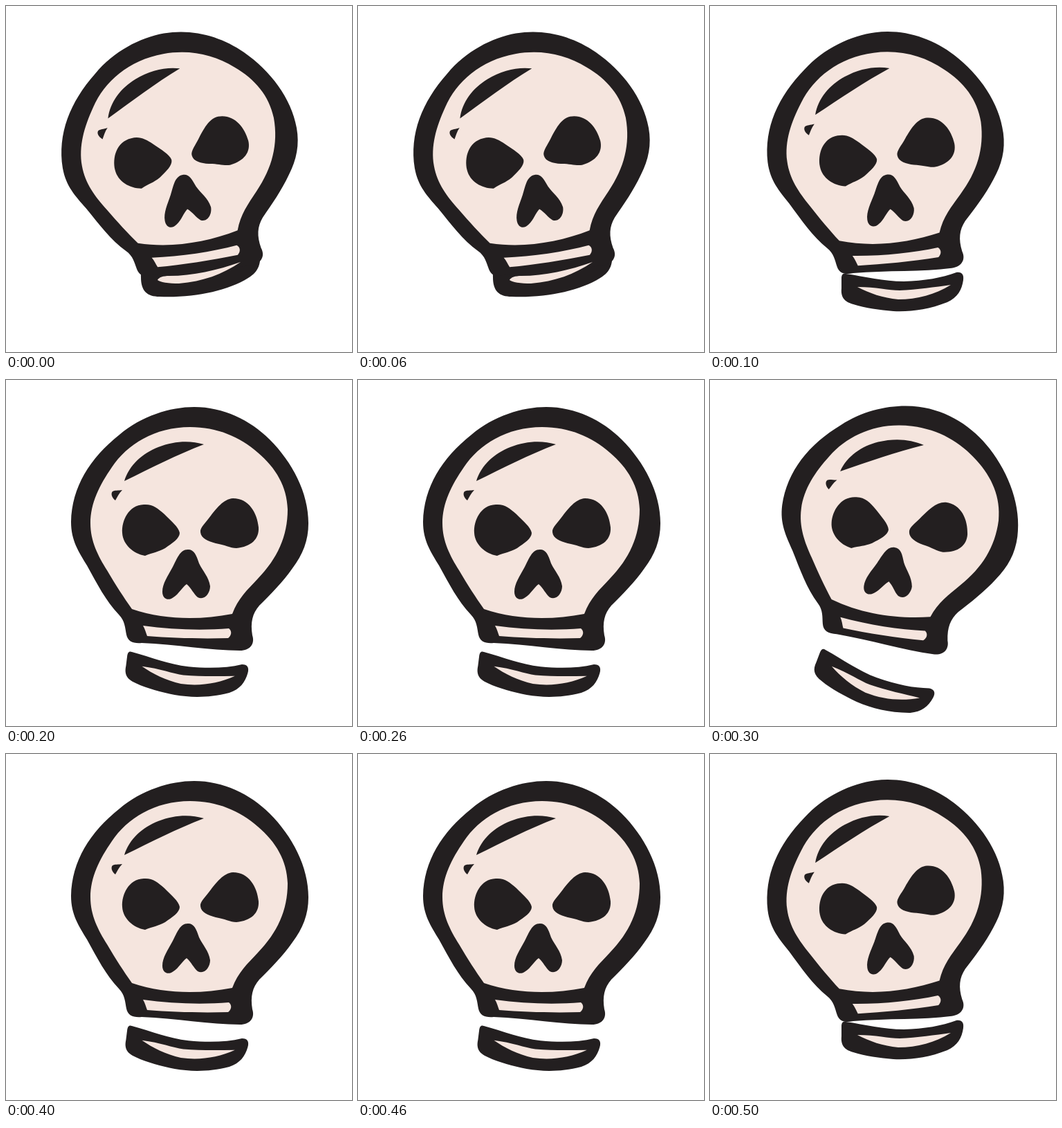
Write an HTML page that moves like this. It is 500 px wide and 500 px high and loops after 600 ms.

```html
<!DOCTYPE html>
<html lang="en">
<head>
<meta charset="utf-8">
<title>Chattering skull</title>
<style>
  html, body { margin: 0; width: 100%; height: 100%; overflow: hidden; background: #fff; }
  svg { display: block; width: 100%; height: 100%; }
  .ink { fill: #231f20; }
  .bone { fill: #f5e5de; }
</style>
</head>
<body>
<svg viewBox="0 0 500 500">
  <!-- closed jaw, merged with the neck -->
  <path id="base" class="ink" d="M180 350C192 366 195 378 195 392C195 412 204 420 222 420C270 422 320 412 350 393C366 383 368 374 368 350L340 330Z"/>

  <g id="jaw">
    <path class="ink" d="M196 387C225 391 250 398 280 398C310 397 335 393 356 385C364 384 367 388 366 396C364 410 358 421 343 428C315 439 290 442 265 441C245 439 225 437 207 431C193 427 189 420 190 408L190 394C190 388 192 386 196 387Z"/>
    <path class="bone" d="M213 406C240 406 258 411 274 411C300 410 325 406 348 403C325 417 300 424 272 424C250 422 230 415 213 406Z"/>
  </g>

  <g id="skull">
    <path class="ink" d="M272 39C237 39 196 52 164 79C121 113 95 155 94 205C94 232 105 248 117 268C132 295 144 319 163 339C172 348 172 358 174 368C176 378 184 381 196 380C245 382 295 391 338 391C353 391 360 381 356 369C353 350 356 338 366 326C382 310 400 292 414 272C429 252 437 232 437 207C437 163 414 119 381 86C353 58 314 39 272 39Z"/>
    <path class="bone" d="M266 68C215 68 175 93 153 126C135 152 122 178 122 207C122 233 133 254 146 275C159 297 170 314 182 331C230 347 280 347 327 338C335 316 349 303 364 287C392 258 407 226 407 187C406 154 390 127 364 105C338 82 305 68 266 68Z"/>
    <!-- eyes and nose -->
    <path class="ink" d="M199 180C177 181 167 203 168 221C169 238 184 251 201 254C213 249 219 249 230 243C240 236 251 229 251 221C250 213 238 203 229 194C219 185 212 179 199 180Z"/>
    <path class="ink" d="M328 171C314 172 304 186 296 196C289 206 280 213 281 220C282 229 292 233 303 236C316 238 324 243 333 243C354 241 366 230 365 213C363 192 351 171 328 171Z"/>
    <path class="ink" d="M263 245C251 245 247 259 241 270C234 283 226 294 226 306C226 316 234 320 242 314C250 309 254 300 261 295C268 301 271 309 277 314C287 319 295 308 295 298C293 284 284 276 279 265C275 253 272 245 263 245Z"/>
    <!-- shine -->
    <path class="ink" d="M171 146C178 123 197 106 220 97C243 88 266 87 286 93C247 108 210 127 171 146Z"/>
    <path class="ink" d="M168 159C163 164 161 169 158 174C153 170 151 164 154 161C157 159 162 160 168 159Z"/>
    <!-- neck slot -->
    <path class="bone" d="M198 355C240 361 285 362 322 359C327 363 326 369 321 373C282 374 240 373 204 370C202 365 201 360 198 355Z"/>
  </g>

  <path id="lip" class="bone" d="M339 370C312 388 285 398 250 401C235 401 222 399 219 396C221 392 227 390 236 390C270 390 305 382 339 370Z"/>
</svg>
<script>
  const STEP = 100;
  const ORDER = [0, 1, 2, 3, 2, 1];
  const SKULL_PIVOT = [241.5, 227];
  const JAW_PIVOT = [279.25, 395.5];

  // Each part: pivot position x, y, then rotation in degrees.
  const POSES = [
    { skull: [231, 230, -10.1], jaw: null },
    { skull: [232.5, 228.5, -7.4], jaw: [279.25, 395.5, 0] },
    { skull: [241.5, 227, 0], jaw: [263.5, 411.75, 7.2] },
    { skull: [247.8, 221.3, 7.3], jaw: [241.5, 427.75, 21] }
  ];

  const [base, jaw, skull, lip] =
    ['base', 'jaw', 'skull', 'lip'].map(id => document.getElementById(id));

  function place(part, [x, y, angle], [px, py]) {
    part.setAttribute('transform',
      `translate(${x} ${y}) rotate(${angle}) translate(${-px} ${-py})`);
  }

  function show(part, on) {
    part.setAttribute('visibility', on ? 'visible' : 'hidden');
  }

  function draw(time) {
    const pose = POSES[ORDER[Math.floor(time / STEP) % ORDER.length]];
    const open = pose.jaw !== null;
    place(skull, pose.skull, SKULL_PIVOT);
    if (open) place(jaw, pose.jaw, JAW_PIVOT);
    show(jaw, open);
    show(base, !open);
    show(lip, !open);
  }

  const start = performance.now();
  function tick() {
    draw(performance.now() - start);
    requestAnimationFrame(tick);
  }
  tick();
</script>
</body>
</html>
```
